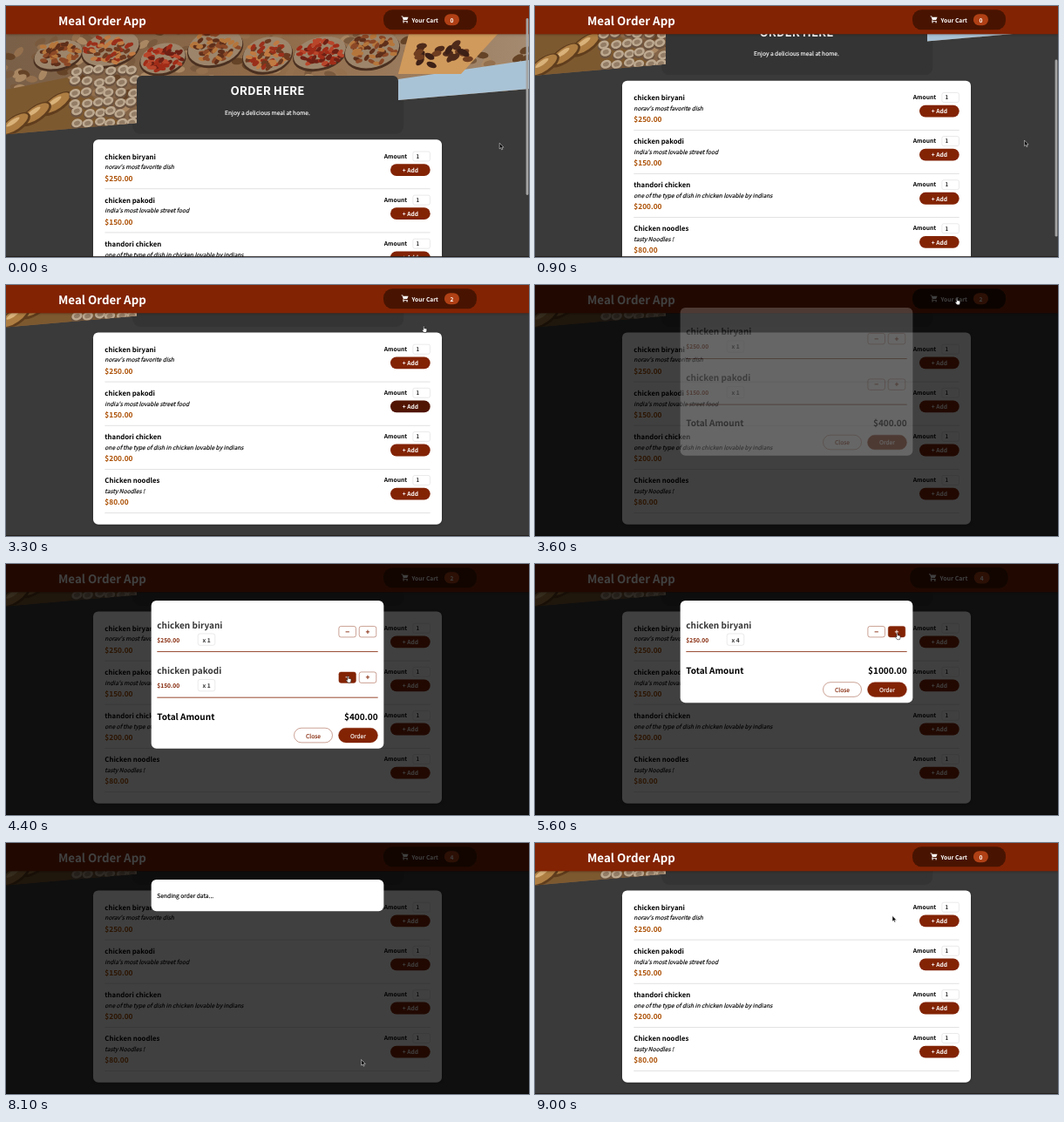
Recreate the animation shown at these times as an HTML page. Size 600x288 px, loop 9.6 s.

```html
<!DOCTYPE html>
<html lang="en">
<head>
<meta charset="utf-8">
<title>Meal Order App</title>
<style>
  html, body { margin: 0; width: 100%; height: 100%; overflow: hidden; background: #3a3a3a; }
  svg { display: block; width: 100vw; height: 100vh; }
  text {
    font-family: "Noto Sans CJK JP", "Noto Sans CJK SC", "Noto Sans", sans-serif;
    font-size: 6.667px; text-rendering: geometricPrecision; white-space: pre; stroke-width: .14;
  }
  .b, .h1, .h2, .h3, .price { font-weight: 700; stroke-width: 0; }
  .i { font-style: italic; }
  .h1 { font-size: 13.333px; }
  .h2 { font-size: 10px; }
  .h3 { font-size: 7.8px; }
  .price { font-size: 8.333px; }
  .hot { fill: var(--off); }
  .hot.on { fill: var(--on); }
  .hot.on + .sign { fill: #fff; }
</style>
</head>
<body>
<svg id="stage" viewBox="0 0 600 288" xmlns="http://www.w3.org/2000/svg"></svg>
<script>
const LOOP = 9600, STEP = 100, LAG = 200;
const BROWN = '#822304', DARK = '#481401', DEEP = '#511503', LINE = '#ccc', PAGE = '#3a3a3a', PANEL = '#343434';
const LEFT = 173.33, RIGHT = 426.67, TOP = 41.9;   // modal content edges
const ROW = 50.1, ITEM = 52.5;                     // pitch of meals and of cart items

const meals = [
  ['chicken biryani', "norav's most favorite dish", 250],
  ['chicken pakodi', "india's most lovable street food", 150],
  ['thandori chicken', 'one of the type of dish in chicken lovable by indians', 200],
  ['Chicken noodles', 'tasty Noodles !', 80]
];
const money = n => '$' + n.toFixed(2);

// ---- markup helpers
const text = (x, y, str, cls = '', fill = '#000', anchor = 'start') =>
  `<text x="${x}" y="${y}" class="${cls}" fill="${fill}" stroke="${fill}" text-anchor="${anchor}">${str}</text>`;
const rect = (x, y, w, h, fill, r = 0, more = '') =>
  `<rect x="${x}" y="${y}" width="${w}" height="${h}" rx="${r}" fill="${fill}" ${more}/>`;
const outline = (x, y, w, h, fill, r, color, more = '') =>
  rect(x + 0.21, y + 0.21, w - 0.42, h - 0.42, fill, r, `stroke="${color}" stroke-width=".42" ${more}`);
const hot = (off, on) => `class="hot" style="--off:${off};--on:${on}"`;
const ellipse = (x, y, rx, ry, turn, fill) =>
  `<ellipse rx="${rx}" ry="${ry}" transform="translate(${x} ${y}) rotate(${turn})" fill="${fill}"/>`;
const poly = (points, fill) => `<polygon points="${points}" fill="${fill}"/>`;
const shadow = (x, y, w, h, r) => rect(x, y, w, h, '#000', r, 'opacity=".25" filter="url(#soft)"');

// ---- static parts
function photo() {
  let seed = 11;
  const rnd = (lo = 0, hi = 1) => lo + (hi - lo) * ((seed = (seed * 16807) % 2147483647) / 2147483647);
  const scatter = (n, cx, cy, w, h, size, colors) => {
    let out = '';
    for (let k = 0; k < n; k++) {
      const a = rnd(0, 6.283), d = Math.sqrt(rnd());
      out += ellipse(cx + Math.cos(a) * d * w, cy + Math.sin(a) * d * h,
        size, size * 0.55, rnd(-60, 30), colors[k % colors.length]);
    }
    return out;
  };
  const foods = [['#8c4826', '#5f2f1a', '#b5763c'], ['#9a2f1a', '#6d3a20', '#c07a42'], ['#a02c18', '#b8452a', '#6f2014']];

  let s = rect(0, 0, 600, 160, 'url(#table)');
  s += scatter(220, 300, 75, 330, 55, 7, ['#7a5a3e', '#94704e', '#654326', '#a98763']);
  s += poly('400,112 450,84 600,62 600,130 400,130', '#a9c3d6');
  for (let k = 0; k < 7; k++) {
    const x = 60 + k * 60, y = rnd(46, 60), rx = rnd(24, 34), ry = rnd(15, 21);
    s += ellipse(x, y + 2, rx + 1, ry + 1, -15, '#4a3020') + ellipse(x, y, rx, ry, -15, '#9c856b')
      + scatter(55, x, y, rx * 0.85, ry * 0.85, 4, foods[k % 3]);
  }
  s += poly('450,78 462,32 566,30 522,78', '#d09a5c') + scatter(22, 500, 55, 34, 17, 6, ['#4e2a1a', '#6f3d20', '#3d2016']);
  s += poly('0,96 70,82 150,142 150,160 0,160', '#7d5930');
  for (let k = 0; k < 3; k++) {
    const x = 58 - k * 24, y = 112 + k * 12;
    s += ellipse(x, y, 21, 9, -35, '#5f3d1d') + ellipse(x, y - 1, 18, 7, -35, '#ad7d42')
      + ellipse(x - 2, y - 3, 9, 2.5, -35, '#d9b27a');
  }
  for (let k = 0; k < 36; k++) {
    const x = 80 + k % 6 * 13 + rnd(-2, 3), y = 74 + Math.floor(k / 6) * 12 + rnd(-2, 2);
    s += ellipse(x, y + 2, 7, 5.4, -20, '#6b5340') + ellipse(x, y, 6.3, 4.8, -20, '#bda990')
      + ellipse(x, y, 3.6, 2.5, -20, '#947d66');
  }
  return `<g clip-path="url(#slant)">${s}</g>`;
}

const summary = () => rect(150, 80, 300, 60, PANEL, 5.83)
  + text(300, 102.1, 'ORDER HERE', 'h1', '#fff', 'middle')
  + text(300, 124.6, 'Enjoy a delicious meal at home.', '', '#fff', 'middle');

function mealRow([name, note, price], k) {
  const y = 166.6 + k * ROW;
  return text(113.33, y + 9.05, name, 'h3')
    + text(113.33, y + 20.7, note, 'i')
    + text(113.33, y + 33.9, money(price), 'price', '#ab4e02')
    + rect(113.33, y + 43, 373.33, 0.5, '#c4c4c4')
    + text(460, y + 7.9, 'Amount', 'b', '#000', 'end')
    + outline(466.67, y + 0.2, 20, 11.4, '#fff', 2, LINE)
    + text(470.4, y + 8.2, '1')
    + rect(441, y + 14.6, 45.7, 13.8, BROWN, 6.9, hot(BROWN, DEEP))
    + text(463.85, y + 24.3, '+ Add', 'b', '#fff', 'middle');
}

const header = () => shadow(0, -1, 600, 34, 0) + rect(0, 0, 600, 32.3, BROWN)
  + text(60, 21.5, 'Meal Order App', 'h1', '#fff')
  + `<g id="cart">${rect(433, 4.2, 107, 23, DARK, 10.4, hot(DARK, '#2c0d00'))}`
  + `<g transform="translate(453.6 11.2)" fill="#fff"><path d="M0 .3H1.5L2 1.5H8L6.6 4.9H3L2.6 5.8H7.4V6.6H1.4L2.2 4.9.9 1.1H0Z"/>`
  + `<circle cx="2.5" cy="7.6" r=".8"/><circle cx="6.5" cy="7.6" r=".8"/></g>`
  + text(465.6, 18.5, 'Your Cart', 'b', '#fff')
  + rect(502.9, 9.2, 17.1, 13, '#b04015', 6.5)
  + `<g id="badge">${text(511.45, 18.5, '0', 'b', '#fff', 'middle')}</g></g>`;

const stage = document.getElementById('stage');
stage.innerHTML = `<defs>
  <filter id="soft" x="-10%" y="-30%" width="120%" height="160%"><feGaussianBlur stdDeviation="1.67"/></filter>
  <linearGradient id="table" x1="0" x2="1"><stop offset="0" stop-color="#7a6048"/><stop offset=".5" stop-color="#8f6a48"/>
  <stop offset="1" stop-color="#a48a70"/></linearGradient>
  <clipPath id="slant"><path d="M0 0H600V95L0 147.3Z"/></clipPath></defs>`
  + rect(0, 0, 600, 288, PAGE)
  + `<g id="page">${rect(145.2, 80, 311, 66.8, PANEL, 9)}${photo()}${summary()}${shadow(100, 154, 400, 220.4, 5.83)}`
  + rect(100, 153.2, 400, 220.4, '#fff', 5.83) + meals.map(mealRow).join('') + '</g>'
  + header()
  + `<g id="thumb">${rect(596.6, 14, 2.8, 203, '#a5a5a5', 1.4)}</g>`
  + rect(0, 287.2, 600, 0.8, '#1c1816')
  + `<g id="overlay">${rect(0, 0, 600, 288, '#000', 0, 'opacity=".75"')}<g id="modal"></g></g>`
  + `<g id="cursor"><path id="arrow" d="M0 0V6.6L1.5 5.3 2.5 7.6 3.6 7.1 2.6 4.9H4.7Z" fill="#000" stroke="#fff" stroke-width=".5"/>`
  + `<path id="hand" d="M.7 .6Q1.3 -.2 1.9 .6V3Q2.5 2.5 2.9 3.1 3.5 2.7 3.9 3.3 4.6 3 4.9 3.7V5.4L4.2 7.7H1.4L-.8 4.9Q-.7 4 .2 4.4L.7 4.9Z" fill="#fff" stroke="#000" stroke-width=".5"/></g>`;

const el = {};
stage.querySelectorAll('[id]').forEach(node => el[node.id] = node);

// ---- modal views
const button = (right, y, w, label, fill, ink, on = DEEP) =>
  outline(right - w, y, w, 17.1, fill, 8.4, BROWN, hot(fill, on))
  + text(right - w / 2, y + 11.5, label, '', ink, 'middle');

function cartItem([name, , price], count, k) {
  const y = TOP + 13.33 + k * ITEM;
  const sign = (x, label) => outline(x, y + 16, 20, 12.9, '#fff', 2.4, BROWN, hot('#fff', BROWN))
    + text(x + 10, y + 25.6, label, 'price sign', BROWN, 'middle');
  return text(LEFT, y + 18.3, name, 'h2', '#363636')
    + text(LEFT, y + 34.3, money(price), 'b', BROWN)
    + outline(220, y + 24.5, 20, 13.8, '#fff', 2.4, LINE)
    + text(230, y + 34.3, 'x ' + count, 'b', '#363636', 'middle')
    + sign(381.67, '−') + sign(405, '+')
    + rect(LEFT, y + 45, 253.33, 0.83, BROWN);
}

const checkout = y => ['Your Name', 'Street', 'Postal Code', 'City'].map((label, k) =>
  text(LEFT, y + 7.7 + k * 26, label, 'b')
  + outline(LEFT, y + 11.3 + k * 26, 133.3, 11.3, '#fff', 1.6, LINE)).join('')
  + text(344, y + 115.5, 'Cancel', '', DEEP, 'middle')
  + button(RIGHT, y + 104, 51.5, 'Confirm', DEEP, '#fff', '#7a2a08');

const dialog = (height, body) => rect(166.67, TOP, 266.67, height, '#fff', 5.83) + body;
const message = str => text(LEFT, TOP + 21.1, str);

function cartView(list, form) {
  const y = TOP + 41.1 + list.length * ITEM;
  const total = list.reduce((sum, [meal, n]) => sum + meal[2] * n, 0);
  const actions = form ? checkout(y)
    : button(374.7, y, 44.4, 'Close', '#fff', BROWN) + button(RIGHT, y, 45.4, 'Order', BROWN, '#fff');
  return dialog(y - TOP + (form ? 140.5 : 23.8), list.map(([meal, n], k) => cartItem(meal, n, k)).join('')
    + text(LEFT, y - 9.5, 'Total Amount', 'h2')
    + text(RIGHT, y - 9.5, money(total), 'h2', '#000', 'end') + actions);
}

const modals = {
  none: () => '',
  both: () => cartView([[meals[0], 1], [meals[1], 1]]),
  one: n => cartView([[meals[0], n]]),
  form: n => cartView([[meals[0], n]], true),
  sending: () => dialog(36.3, message('Sending order data...')),
  done: () => dialog(53.4, message('Successfully sent the order!') + button(RIGHT, TOP + 29.7, 44.4, 'Close', BROWN, '#fff'))
};

// ---- timeline
// time, meals in the cart, modal
const events = [
  [0, 0, 'none'], [1500, 1, 'none'], [3000, 2, 'none'], [3600, 2, 'both'],
  [4800, 1, 'one'], [5000, 2, 'one'], [5200, 3, 'one'], [5600, 4, 'one'],
  [6500, 4, 'form'], [8100, 4, 'sending'], [8500, 0, 'done'], [9000, 0, 'none']
];
// pointer: leaves, arrives, x, y
const stops = [
  [0, 1, 566.2, 157.3], [840, 1300, 464, 88], [1900, 2400, 464, 138], [3100, 3400, 482.8, 15],
  [3600, 4100, 391, 128.5], [4800, 5000, 414.2, 79], [5700, 6200, 404, 148],
  [6700, 6800, 345, 184], [7200, 7500, 407.6, 248.5], [8600, 8900, 410, 83.5]
];

const clamp = u => Math.min(1, Math.max(0, u));
const part = (t, from, to) => clamp((t - from) / (to - from));
const easeOut = u => 1 - (1 - u) ** 1.66;
const smooth = u => u * u * (3 - 2 * u);
const eventAt = t => events.filter(e => e[0] <= t).pop() || events[0];

function pointerAt(t) {
  let [, , x, y] = stops[0];
  for (const [leave, arrive, toX, toY] of stops) {
    const p = smooth(part(t, leave, arrive));
    x += (toX - x) * p;
    y += (toY - y) * p;
  }
  return [x, y];
}

// scroll to the end, with a small overshoot later on
const scrollAt = t => 98.8 * easeOut(part(t, 500, 1300)) + Math.sin(Math.PI * part(t, 2000, 2400));

function bumpAt(t) {
  const [time, count] = eventAt(t);
  const changed = time > 0 && count !== eventAt(time - 1)[1] && count > 0;
  return changed && t - time < 200 ? 1.05 : 1;
}

// hover follows the pointer a little late
function updateHover(t) {
  const [x, y] = pointerAt(t), offset = scrollAt(t), open = eventAt(t)[2] !== 'none';
  let any = false;
  stage.querySelectorAll('.hot').forEach(node => {
    const box = node.getBBox();
    const dx = x - box.x, dy = y - box.y + (el.page.contains(node) ? offset : 0);
    const on = el.modal.contains(node) === open && dx > 0 && dx < box.width && dy > 0 && dy < box.height;
    node.classList.toggle('on', on);
    any = any || on;
  });
  return any;
}

const move = (node, x, y) => node.setAttribute('transform', `translate(${x} ${y})`);
const show = (node, on) => node.setAttribute('visibility', on ? 'visible' : 'hidden');

function render(t) {
  const offset = scrollAt(t), [, count, view] = eventAt(t);
  move(el.page, 0, -offset);
  move(el.thumb, 0, offset * 0.705);
  show(el.thumb, t < 2600);

  el.badge.firstChild.textContent = count;
  el.cart.setAttribute('transform', `translate(486.5 15.7) scale(${bumpAt(t)}) translate(-486.5 -15.7)`);

  show(el.overlay, view !== 'none');
  el.modal.innerHTML = modals[view](count);
  const p = easeOut(part(t, 3570, 3810));
  el.modal.setAttribute('opacity', p);
  move(el.modal, 0, -20 * (1 - p));

  const hand = updateHover(t - LAG);
  move(el.cursor, ...pointerAt(t));
  show(el.arrow, !hand);
  show(el.hand, hand);
}

const start = performance.now();
let shown = -1;
function tick() {
  const t = Math.floor(((performance.now() - start) % LOOP) / STEP) * STEP;
  if (t !== shown) render(shown = t);
  requestAnimationFrame(tick);
}
tick();
</script>
</body>
</html>
```
